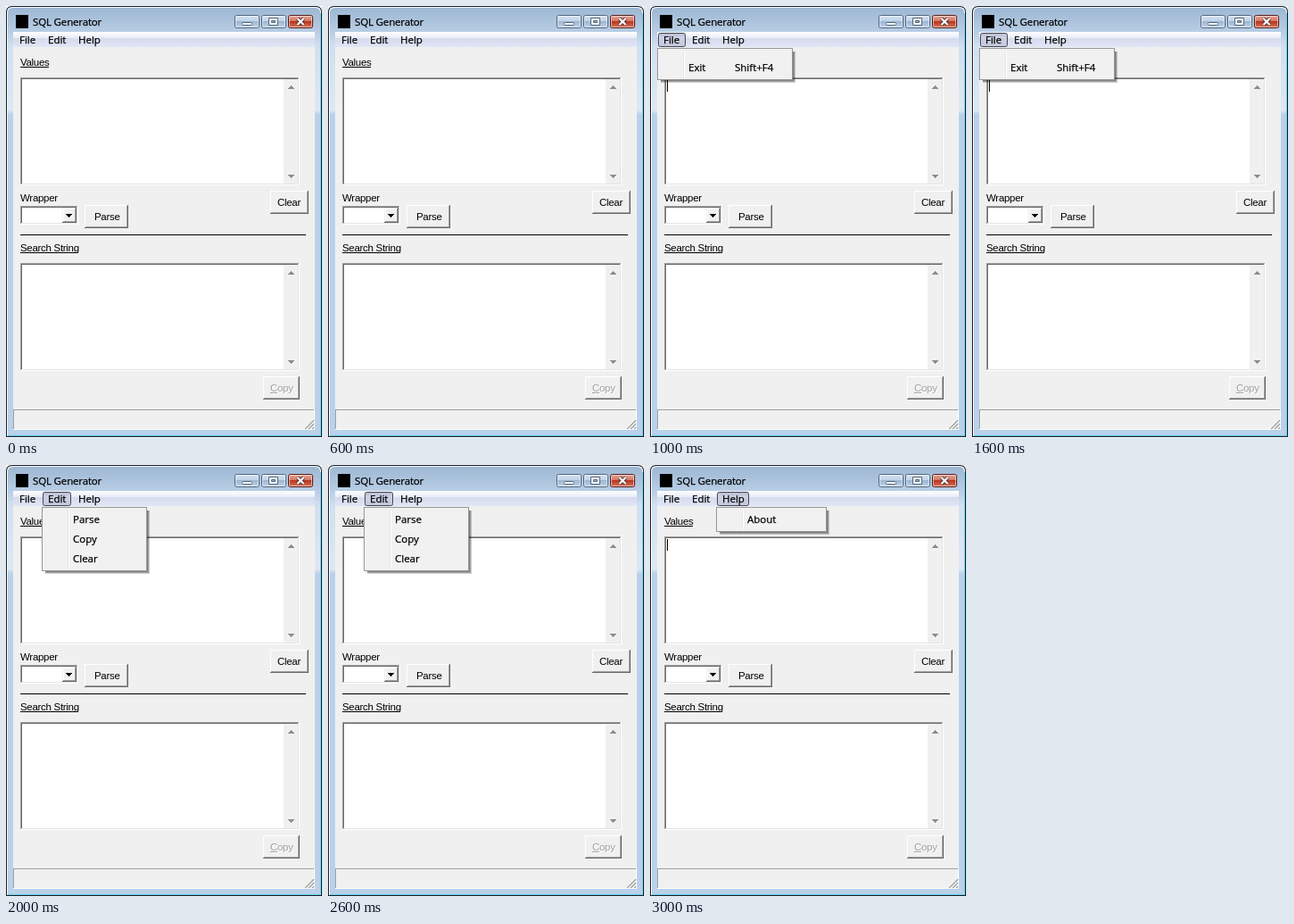
Animation, 354 px wide and 483 px high, one loop 4000 ms. Source, as an HTML page:

```html
<!DOCTYPE html>
<html lang="en">
<head>
<meta charset="utf-8">
<title>SQL Generator</title>
<style>
html, body { margin: 0; width: 100%; height: 100%; overflow: hidden; background: #fff; }
svg { display: block; width: 354px; height: 483px; }
text { font: 11.5px "Liberation Sans", Arial, sans-serif; letter-spacing: -.3px; fill: #000; white-space: pre; }
.ui text { font-family: "Open Sans", "Noto Sans", sans-serif; letter-spacing: 0; stroke: #000; stroke-width: .25px; }
.ui .title { letter-spacing: -.15px; }
.crisp { shape-rendering: crispEdges; }
path.line { fill: none; stroke-width: 1; shape-rendering: crispEdges; }
.hot { fill: url(#hot); stroke: #454558; }
.menu { fill: #f1f1f1; stroke: #979797; shape-rendering: crispEdges; }
.shade path { fill: #000; fill-opacity: .2; shape-rendering: crispEdges; }
.state { visibility: hidden; animation: show 4s step-end infinite; }
.file { animation-delay: -3s; }
.edit { animation-delay: -2s; }
.help { animation-delay: -1s; }
@keyframes show {
  0% { visibility: visible; }
  25%, 100% { visibility: hidden; }
}
</style>
</head>
<body>
<svg viewBox="0 0 354 483">
  <defs>
    <linearGradient id="frame" x2="0" y2="1">
      <stop offset="0" stop-color="#9db7d3"/>
      <stop offset=".06" stop-color="#bacfe6"/>
      <stop offset=".09" stop-color="#d0e0f1"/>
      <stop offset=".24" stop-color="#dce8f5"/>
      <stop offset=".25" stop-color="#b9d1ea"/>
      <stop offset="1" stop-color="#b9d1ea"/>
    </linearGradient>
    <linearGradient id="bar" x2="0" y2="1">
      <stop offset="0" stop-color="#fff"/>
      <stop offset=".42" stop-color="#e7ebf6"/>
      <stop offset=".43" stop-color="#d5dbed"/>
      <stop offset="1" stop-color="#e1e6f6"/>
    </linearGradient>
    <linearGradient id="blue" x2="0" y2="1">
      <stop offset="0" stop-color="#d5e3f2"/>
      <stop offset=".48" stop-color="#bfd2e7"/>
      <stop offset=".5" stop-color="#9db6d2"/>
      <stop offset="1" stop-color="#bfd5eb"/>
    </linearGradient>
    <linearGradient id="red" x2="0" y2="1">
      <stop offset="0" stop-color="#e9a698"/>
      <stop offset=".48" stop-color="#d27460"/>
      <stop offset=".5" stop-color="#b8361f"/>
      <stop offset="1" stop-color="#d9785a"/>
    </linearGradient>
    <linearGradient id="hot" x2="0" y2="1">
      <stop offset="0" stop-color="#b5b8cc"/>
      <stop offset=".3" stop-color="#cdd1e3"/>
      <stop offset="1" stop-color="#c5c9de"/>
    </linearGradient>

    <path id="up" class="crisp" d="M0 4h7v-1h-1v-1h-1v-1h-1v-1h-1v1h-1v1h-1v1h-1z" fill="#8c8c8c"/>
    <path id="down" class="crisp" d="M0 0h7v1h-1v1h-1v1h-1v1h-1v-1h-1v-1h-1v-1h-1z"/>

    <g id="memo">
      <rect class="crisp" width="313" height="121" fill="#fff"/>
      <rect class="crisp" x="295" y="2" width="16" height="117" fill="#f0f0f0"/>
      <path class="line" d="M.5 120V.5H312" stroke="#a0a0a0"/>
      <path class="line" d="M1.5 119V1.5H311" stroke="#696969"/>
      <path class="line" d="M311.5 1V119.5H1" stroke="#e3e3e3"/>
      <use href="#up" x="300" y="9"/>
      <use href="#down" x="300" y="109" fill="#8c8c8c"/>
    </g>
    <rect id="caret" class="crisp" x="19" y="83" width="1" height="13"/>
  </defs>

  <!-- Window frame -->
  <path d="M0 483V7Q0 0 7 0H347Q354 0 354 7V483Z" fill="#1b1f24"/>
  <path d="M1 482V7Q1 1 7 1H347Q353 1 353 7V482Z" fill="#f4f9fd"/>
  <path d="M2 481V8Q2 2 8 2H346Q352 2 352 8V481Z" fill="url(#frame)"/>
  <path class="line" d="M352.5 8V481.5H2" stroke="#5fd0ee"/>
  <rect class="crisp" x="11" y="10" width="14" height="15"/>

  <!-- Caption buttons -->
  <g stroke="#53657b">
    <rect x="256.5" y="10.5" width="27" height="14" rx="2" fill="url(#blue)"/>
    <rect x="286.5" y="10.5" width="27" height="14" rx="2" fill="url(#blue)"/>
    <rect x="316.5" y="10.5" width="27" height="14" rx="2" fill="url(#red)" stroke="#5a1a17"/>
    <g fill="none" stroke="#fff" stroke-opacity=".55">
      <rect x="257.5" y="11.5" width="25" height="12" rx="1"/>
      <rect x="287.5" y="11.5" width="25" height="12" rx="1"/>
      <rect x="317.5" y="11.5" width="25" height="12" rx="1"/>
    </g>
    <rect x="264.5" y="18.5" width="11" height="3" rx="1" fill="#fff"/>
    <path d="M294.5 13.5h10v8h-10zM297.5 16.5h4v2h-4z" fill="#fff" fill-rule="evenodd"/>
    <path d="M326.5 14l7 7M333.5 14l-7 7" stroke="#52343a" stroke-width="4"/>
    <path d="M326.5 14l7 7M333.5 14l-7 7" stroke="#fff" stroke-width="2.2"/>
  </g>

  <!-- Client area -->
  <rect class="crisp" x="8" y="29" width="338" height="446" fill="#f0f0f0"/>
  <rect class="crisp" x="8" y="29" width="338" height="17" fill="url(#bar)"/>
  <path class="line" d="M8 46.5H346" stroke="#f0f0f0"/>

  <text x="16" y="67">Values</text>
  <path class="line" d="M16 68.5H48M16 276.5H81M16 256.5H336" stroke="#000"/>
  <use href="#memo" x="16" y="80"/>
  <text x="16" y="219">Wrapper</text>
  <text x="16" y="275">Search String</text>
  <use href="#memo" x="16" y="288"/>

  <!-- Combo box -->
  <rect class="crisp" x="16" y="224" width="65" height="21" fill="#fff"/>
  <path class="line" d="M16.5 244V224.5H80" stroke="#a0a0a0"/>
  <path class="line" d="M17.5 243V225.5H79" stroke="#696969"/>
  <path class="line" d="M79.5 225V243.5H17" stroke="#e3e3e3"/>
  <rect class="crisp" x="63" y="226" width="16" height="17" fill="#f0f0f0"/>
  <path class="line" d="M64.5 241V227.5H77" stroke="#fff"/>
  <path class="line" d="M78.5 226V242.5H63" stroke="#696969"/>
  <path class="line" d="M77.5 227V241.5H64" stroke="#a0a0a0"/>
  <use href="#down" x="67" y="233"/>

  <!-- Push buttons -->
  <path class="line" d="M88.5 248V223.5H136M296.5 231V207.5H338M288.5 440V415.5H328" stroke="#fff"/>
  <path class="line" d="M136.5 223V248.5H88M338.5 207V232.5H296M328.5 415V440.5H288" stroke="#696969"/>
  <path class="line" d="M135.5 224V247.5H89M337.5 208V231.5H297M327.5 416V439.5H289" stroke="#a0a0a0"/>
  <text x="99" y="240">Parse</text>
  <text x="304" y="224">Clear</text>
  <text x="297" y="433" style="fill:#fff">Copy</text>
  <text x="296" y="432" style="fill:#a0a0a0">Copy</text>
  <path class="line" d="M297 434.5H305" stroke="#fff"/>
  <path class="line" d="M296 433.5H304" stroke="#a0a0a0"/>

  <!-- Status bar -->
  <path class="line" d="M8.5 474V452.5H345" stroke="#a0a0a0"/>
  <path class="line" d="M345.5 453V474.5H8" stroke="#fff"/>
  <path d="M335 474l10-10M339 474l6-6M343 474l2-2" stroke="#a0a0a0" stroke-width="1.6"/>
  <path d="M333.5 474l11.5-11.5M337.5 474l7.5-7.5M341.5 474l3.5-3.5" stroke="#fff" stroke-width=".8"/>

  <g class="state file"><use href="#caret"/></g>
  <g class="state help"><use href="#caret"/></g>

  <!-- Menus -->
  <g class="ui">
    <g class="state file">
      <rect class="hot" x="9.5" y="30.5" width="30" height="15" rx="2"/>
      <g class="shade">
        <path d="M12 83H160V51H163V86H12Z"/>
        <path d="M12 83H160V51H162V85H12Z"/>
        <path d="M12 83H160V51H161V84H12Z"/>
      </g>
      <rect class="menu" x="8.5" y="47.5" width="151" height="35"/>
      <path class="line" d="M37.5 50V81" stroke="#e6e6e6"/>
      <path class="line" d="M38.5 50V81" stroke="#fff"/>
      <text x="43" y="73">Exit</text>
      <text x="95" y="73">Shift+F4</text>
    </g>
    <g class="state edit">
      <rect class="hot" x="41.5" y="30.5" width="31" height="15" rx="2"/>
      <g class="shade">
        <path d="M44 119H158V51H161V122H44Z"/>
        <path d="M44 119H158V51H160V121H44Z"/>
        <path d="M44 119H158V51H159V120H44Z"/>
      </g>
      <rect class="menu" x="40.5" y="47.5" width="117" height="71"/>
      <path class="line" d="M69.5 50V117" stroke="#e2e3e3"/>
      <path class="line" d="M70.5 50V117" stroke="#fff"/>
      <text x="75" y="65">Parse</text>
      <text x="75" y="87">Copy</text>
      <text x="75" y="109">Clear</text>
    </g>
    <g class="state help">
      <rect class="hot" x="75.5" y="30.5" width="35" height="15" rx="2"/>
      <g class="shade">
        <path d="M78 75H198V51H201V78H78Z"/>
        <path d="M78 75H198V51H200V77H78Z"/>
        <path d="M78 75H198V51H199V76H78Z"/>
      </g>
      <rect class="menu" x="74.5" y="47.5" width="123" height="27"/>
      <path class="line" d="M103.5 50V73" stroke="#e6e6e6"/>
      <path class="line" d="M104.5 50V73" stroke="#fff"/>
      <text x="109" y="65">About</text>
    </g>
    <text class="title" x="30" y="22">SQL Generator</text>
    <text x="15" y="42">File</text>
    <text x="47" y="42">Edit</text>
    <text x="81" y="42">Help</text>
  </g>
</svg>
</body>
</html>
```
